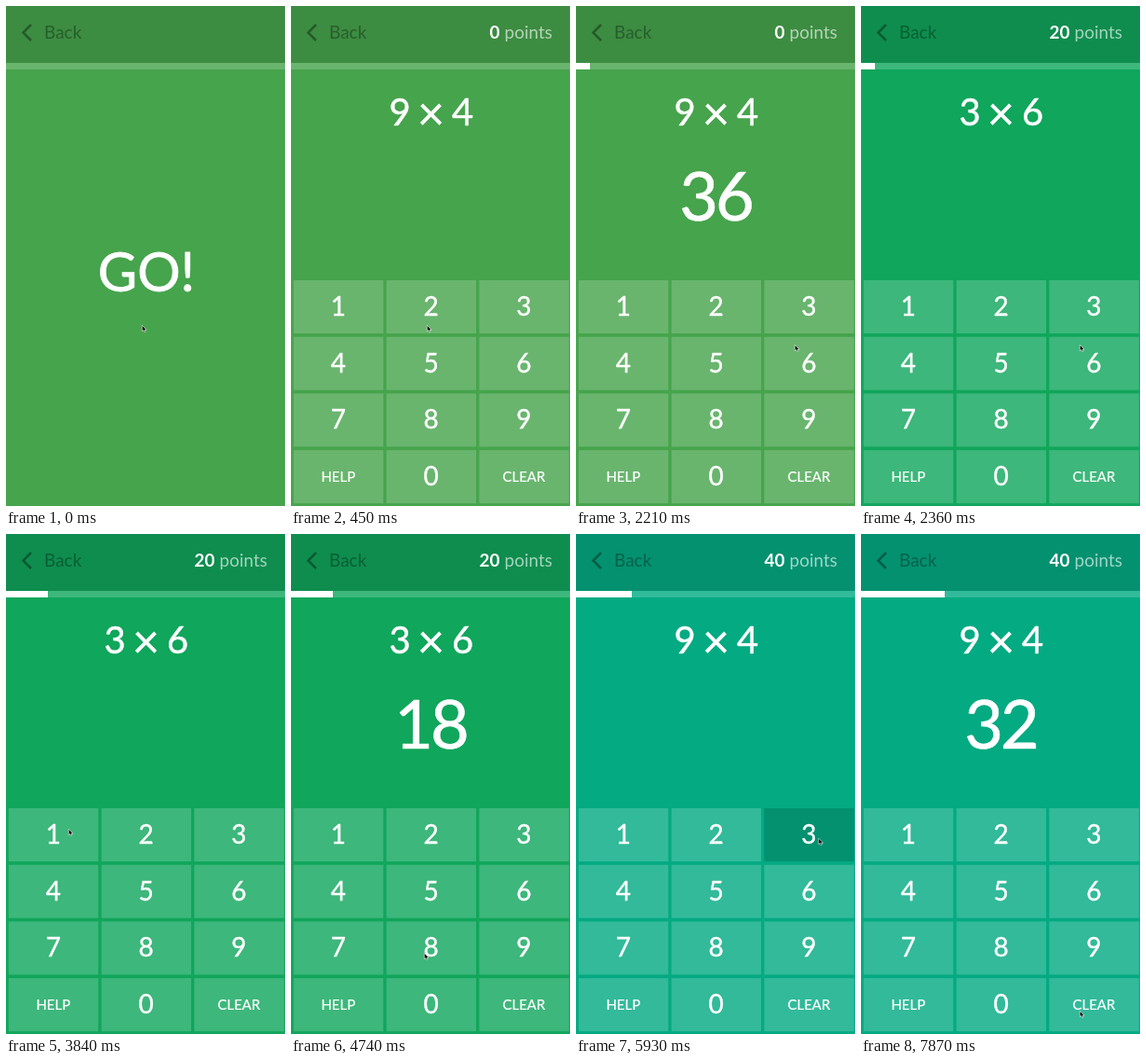
Write an HTML page that moves like this. It is 300 by 536 pixels and loops after 8000 ms.

```html
<!DOCTYPE html>
<html lang="en">
<head>
<meta charset="utf-8">
<title>Times tables</title>
<style>
html, body { margin: 0; height: 100%; overflow: hidden; }
svg { display: block; width: 100vw; height: 100vh; font-family: Lato, "Open Sans", sans-serif; fill: #fff; }
.mid { text-anchor: middle; }
.bold { text-anchor: end; font-weight: bold; }
.key { fill: #fff; fill-opacity: .19; }
.key.down { fill: #000; fill-opacity: .15; }
.digit { font-size: 28px; stroke: #fff; stroke-width: .4; }
.word { font-size: 15px; stroke: #fff; stroke-width: .2; }
.sum { font-size: 40px; stroke: #fff; stroke-width: .5; }
.answer { font-size: 72px; letter-spacing: -3px; stroke: #fff; stroke-width: .7; }
</style>
</head>
<body>
<svg viewBox="0 0 300 536" preserveAspectRatio="none">
  <rect id="bg" width="300" height="536"/>
  <rect width="300" height="61" fill="#000" fill-opacity=".15"/>
  <rect y="61" width="300" height="7" fill-opacity=".19"/>
  <rect id="bar" y="61" height="7"/>
  <g fill="#000" fill-opacity=".33" font-size="19">
    <path d="M27 20L18.5 28.5L27 37" fill="none" stroke="#000" stroke-opacity=".36" stroke-width="2.5"/>
    <text x="41" y="35">Back</text>
  </g>
  <text id="go" class="mid" x="151" y="306" font-size="58" stroke="#fff" stroke-width=".8">GO!</text>
  <g id="game">
    <g font-size="19">
      <text id="score" class="bold" x="224.5" y="35"></text>
      <text x="229.5" y="35" fill-opacity=".62">points</text>
    </g>
    <g class="mid sum">
      <text id="left" x="117" y="128"></text>
      <text x="150.5" y="132.5" font-size="50">×</text>
      <text id="right" x="184.5" y="128"></text>
    </g>
    <text id="answer" class="mid answer" x="150" y="230"></text>
    <g id="pad"></g>
  </g>
  <path id="cursor" d="M.3 .3V6.6L1.8 5.4L2.8 7.6L4 7L3.1 5H5.1Z" fill="#000" stroke="#fff" stroke-width=".6"/>
</svg>
<script>
const $ = id => document.getElementById(id);
const LOOP = 8000, START = 450;
const labels = ["1", "2", "3", "4", "5", "6", "7", "8", "9", "HELP", "0", "CLEAR"];

$("pad").innerHTML = labels.map((label, i) => {
  const x = 2.8 + i % 3 * 99.8, y = 294 + Math.floor(i / 3) * 60.7;
  const isWord = label.length > 1;
  return `<rect class="key" id="key${label}" x="${x}" y="${y}" width="96.5" height="57"/>
    <text class="mid ${isWord ? "word" : "digit"}" x="${x + 48}" y="${y + (isWord ? 33.5 : 38)}">${label}</text>`;
}).join("");

// Each round: start time, background, score, factors
const rounds = [
  [0, "#46a44c", 0, 9, 4],
  [2360, "#10a65c", 20, 3, 6],
  [4880, "#03aa82", 40, 9, 4]
];
// Time at which the typed answer becomes this text
const answers = [
  [0, ""], [2070, "3"], [2210, "36"], [2360, ""], [4140, "1"], [4740, "18"],
  [4880, ""], [6070, "3"], [7570, "32"]
];
// Key, pressed from, released at
const presses = [
  ["3", 1920, 2070], ["1", 3990, 4140], ["8", 4590, 4740], ["3", 5930, 6070], ["2", 7420, 7570]
];
// Pointer path: time, x, y
const path = [
  [0, 146, 342], [700, 146, 342], [1770, 235, 326], [2000, 235, 326], [2210, 235, 363],
  [2600, 235, 363], [3690, 67, 316], [4100, 67, 316], [4590, 143, 449], [4980, 143, 449],
  [5800, 260.5, 326], [5960, 260.5, 326], [6070, 244, 328], [6520, 149, 328],
  [7450, 149, 328], [7870, 235, 511], [LOOP, 235, 511]
];

const latest = (list, t) => list.filter(entry => entry[0] <= t).pop();
const ease = p => p * p * (3 - 2 * p);

function pointer(t) {
  const i = path.findIndex(point => point[0] > t);
  const [t0, x0, y0] = path[i - 1], [t1, x1, y1] = path[i];
  const p = ease((t - t0) / (t1 - t0));
  return [x0 + (x1 - x0) * p, y0 + (y1 - y0) * p];
}

function draw(t) {
  const [, color, score, left, right] = latest(rounds, t);
  const playing = t >= START;
  $("bg").setAttribute("fill", color);
  $("go").style.display = playing ? "none" : "";
  $("game").style.display = playing ? "" : "none";
  $("score").textContent = score;
  $("left").textContent = left;
  $("right").textContent = right;
  $("answer").textContent = latest(answers, t)[1];
  // One 15px tick every 1.2 seconds
  $("bar").setAttribute("width", 15 * Math.max(0, Math.floor((t - 220) / 1200)));
  for (const label of labels) {
    const down = presses.some(([key, from, to]) => key === label && t >= from && t < to);
    $("key" + label).classList.toggle("down", down);
  }
  $("cursor").setAttribute("transform", `translate(${pointer(t)})`);
}

const origin = performance.now();
function frame() {
  draw((performance.now() - origin) % LOOP);
  requestAnimationFrame(frame);
}
frame();
</script>
</body>
</html>
```
